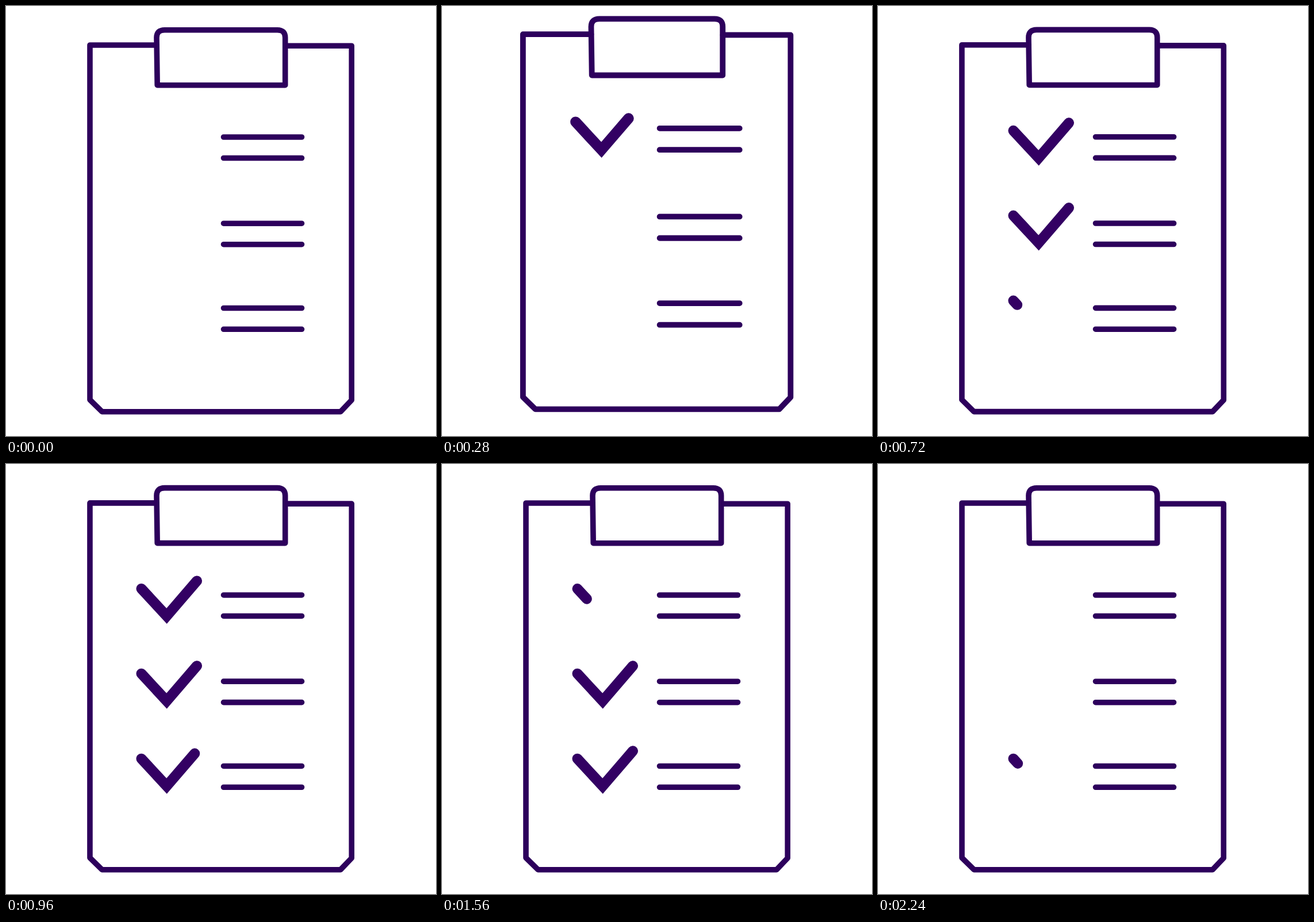
These frames come from a looping animation (748x748 px, 2.28 s). An HTML page:

```html
<!DOCTYPE html>
<html lang="en">
<head>
<meta charset="utf-8">
<title>Checklist</title>
<style>
  html, body { margin: 0; width: 100%; height: 100%; overflow: hidden; background: #fff; }
  svg { display: block; width: 100%; height: 100%; }
  path { fill: none; stroke: #2d005c; stroke-width: 9.6; stroke-linecap: round; stroke-linejoin: round; }
  .check { stroke: #330063; stroke-width: 18; stroke-linejoin: miter; }
</style>
</head>
<body>
<svg viewBox="0 0 748 748">
  <g id="board">
    <path d="M262 68H146V685L167 705.7H582L601.2 685.5V69.2H486"/>
    <path d="M263.2 137.7L262 55Q262 41.7 276 41.7H472Q485.7 41.7 485.7 55V137.7Z"/>
    <path d="M378.5 228H514.5M378.5 264.5H514.5M378.5 378.2H514.5M378.5 414.7H514.5M378.5 525.5H514.5M378.5 562.3H514.5"/>
    <path class="check" pathLength="1" d="M235.5 217L279.5 264.5L332 203.5"/>
    <path class="check" pathLength="1" d="M235.5 364.7L279.5 412.2L332 351.2"/>
    <path class="check" pathLength="1" d="M235.5 512.7L279.5 560.2L332 499.2"/>
  </g>
</svg>
<script>
const LOOP = 2280, STEP = 40, DRAW = 333;
const PEAK = 240, REST = 480;
const drawAt = [0, 333, 667], eraseAt = [1313, 1630, 1964];
const board = document.getElementById('board');
const checks = document.querySelectorAll('.check');

function ease(t, start) {
  const s = Math.min(1, Math.max(0, (t - start) / DRAW));
  return s * s * (3 - 2 * s);
}

// Damped 4 Hz overshoot
function wobble(ms) {
  const s = ms / 1000;
  return 0.0098 * Math.sin(8 * Math.PI * s) * Math.exp(-8 * s);
}

function scaleAt(t) {
  if (t < PEAK) return 1 + 0.02 * t / PEAK;
  if (t < REST) return 1 + 0.02 * (REST - t) / (REST - PEAK) + wobble(t - PEAK);
  return 1 - wobble(t - REST);
}

function render(now) {
  const t = Math.floor((now % LOOP) / STEP) * STEP;
  board.setAttribute('transform', `translate(373.5 897) scale(${scaleAt(t)}) translate(-373.5 -897)`);
  checks.forEach((check, i) => {
    const shown = ease(t, drawAt[i]) - ease(t, eraseAt[i]);
    check.style.display = shown > 0.0005 ? '' : 'none';
    check.style.strokeDasharray = shown < 1 ? `${shown} 2` : 'none';
  });
}

const start = performance.now();
function tick() {
  render(performance.now() - start);
  requestAnimationFrame(tick);
}
tick();
</script>
</body>
</html>
```
